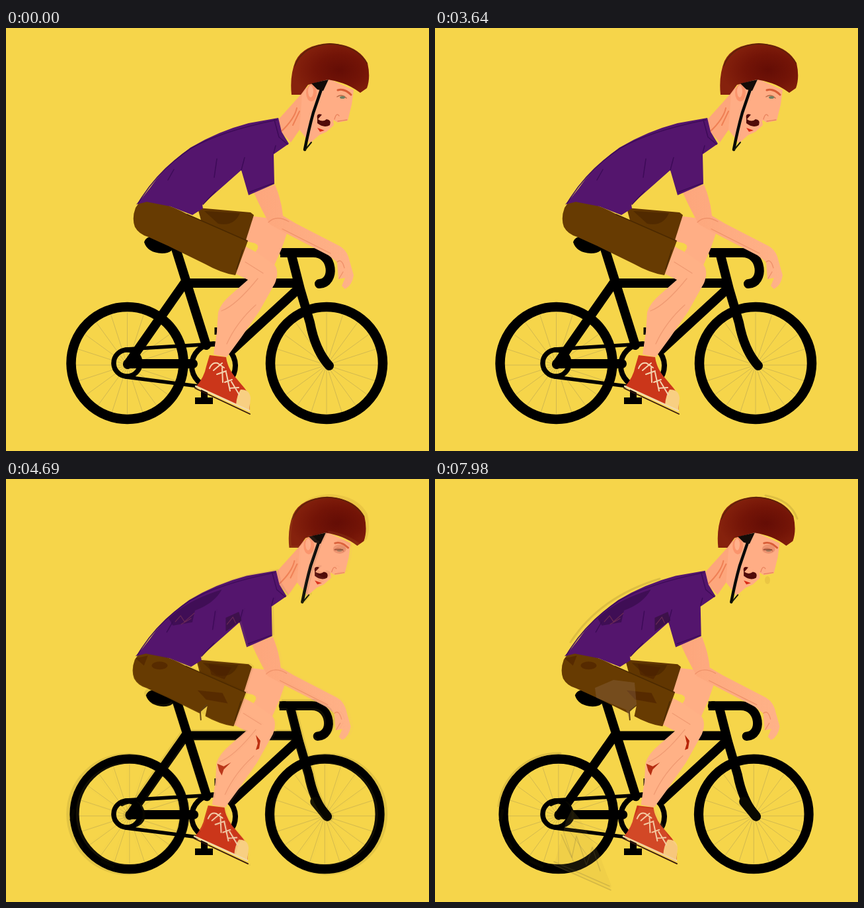
An HTML page for the animation above (8000 ms loop, 640 px wide and 640 px high).

```html
<!DOCTYPE html>
<html lang="en">
<head>
<meta charset="utf-8">
<title>Cyclist</title>
<style>
html, body { margin: 0; width: 100%; height: 100%; overflow: hidden; background: #f6d54a; }
svg { display: block; width: 100vw; height: 100vh; }
.line { fill: none; stroke-linecap: round; stroke-linejoin: round; }
</style>
</head>
<body>
<svg viewBox="0 0 640 640">
  <defs>
    <radialGradient id="helmetFill" cx=".62" cy=".52" r=".6">
      <stop offset="0" stop-color="#640d05"/>
      <stop offset=".5" stop-color="#731407"/>
      <stop offset="1" stop-color="#86220d"/>
    </radialGradient>
    <linearGradient id="skin" x1="0" x2="1">
      <stop offset="0" stop-color="#fda67c"/>
      <stop offset="1" stop-color="#ffb288"/>
    </linearGradient>

    <g id="bike" class="line" stroke="#000">
      <g id="spokes" stroke="#a99854" stroke-width=".8" opacity=".6"></g>
      <g stroke-width="14.500">
        <circle cx="183.5" cy="507" r="85"/>
        <circle cx="485" cy="507" r="85"/>
      </g>
      <g stroke-width="14">
        <path d="M257 334L303 480M270 386H440M270 386L184 509M184 508H283M443 394L342 487"/>
        <path d="M432 344L445 395L460 446Q468 488 489 511"/>
        <path d="M421 340H465C496 340 499 386 474 387"/>
        <path d="M415 340H425" stroke-linecap="butt"/>
      </g>
      <path d="M209 324Q212 313 232 315L254 325Q255 341 236 341Q214 340 209 324Z" fill="#000" stroke="none"/>
    </g>

    <g id="chain" class="line" stroke="#000">
      <circle cx="183" cy="507" r="20" stroke-width="7.500"/>
      <path d="M181 486L315 478M181 528L315 545" stroke-width="5.500"/>
      <circle cx="314" cy="511" r="33" stroke-width="8"/>
      <path d="M286 564H313M300 545V564" stroke-width="10" stroke-linecap="butt"/>
      <path d="M317.500 453V464" stroke-width="4" stroke-linecap="butt"/>
    </g>

    <g id="shoe">
      <path d="M308 495L333 498Q335 513 345 526L361 545Q372 558 368 580L288 542Q300 528 303 512Z" fill="#cb361a"/>
      <path d="M355 547Q369 547 370 560L368 579L348 570Q349 556 355 547Z" fill="#f8cf82"/>
      <path d="M287 542L368 579" class="line" stroke="#f4dba8" stroke-width="2.500"/>
      <path d="M286 545L369 584" class="line" stroke="#38170c" stroke-width="1.800"/>
      <path d="M308 515Q312 505 320 507L330 514M314 518L327 507M319 524L333 519M327 514L328 536M333 521L339 549M331 536L342 532M341 535L353 555M338 545L352 544" class="line" stroke="#f4d4b0" stroke-width="2"/>
    </g>

    <g id="rider">
      <path d="M366 284L400 288L428 302L417 334L405 361L380 350L378 338Q386 328 374 325L360 322Z" fill="#ffae85"/>
      <path d="M290 272L370 279L375 283L363 321L300 310Z" fill="#613601"/>
      <path d="M300 277L354 280Q345 301 321 296Z" fill="#512a00"/>
      <path d="M354 326L380 340L406 358Q414 368 407 386L383 429L356 468L334 498L314 494L319 460L321 430Q325 416 342 402L366 381L344 370Z" fill="#ffb186"/>
      <path d="M326 428Q348 420 381 379M334 478Q349 445 378 419M362 354L389 371" class="line" stroke="#f09a72" stroke-width="1.300"/>
      <path d="M203 262Q235 260 275 282L366 322L347 374Q326 371 301 357L246 330L215 316Q201 312 195 301Q190 288 196 272Z" fill="#673b02"/>
      <path d="M274 282L365 322M349 365L358 336" class="line" stroke="#4b2900" stroke-width="1.500"/>
      <use href="#shoe"/>
      <path d="M375 249L407 237Q417 261 419 284L439 296L505 330Q517 337 520 353L526 374Q524 389 513 395L508 390L513 378L503 380L501 354L488 344L430 314L399 297Q384 270 375 249Z" fill="url(#skin)"/>
      <path d="M397 294Q409 282 428 293M501 354Q508 348 512 363M504 379L510 369M418 304L491 341" class="line" stroke="#ef9169" stroke-width="1.300"/>
      <path d="M409 142L444 103L452 91L462 90L449 147L431 173L416 157Z" fill="#fda67c"/>
      <path d="M416 157Q437 137 440 121M434 147L444 126" class="line" stroke="#ef8055" stroke-width="2"/>
      <path d="M197 267Q212 251 228 228Q249 203 279 181Q321 156 367 144L412 136L417 157L428 175L405 191L406 236L367 253L356 215Q328 240 297 267L298 273L282 283L249 270L213 263Z" fill="#54156d"/>
      <path d="M200 265Q230 215 280 182Q325 156 410 139M356 215L361 196M405 189L408 178M369 248L404 235M254 214L245 230M319 198L315 226M406 139L413 165L426 176M298 267L317 247" class="line" stroke="#3d0b58" stroke-width="1.500"/>
      <path d="M448 100L463 83L489 77L526 94L523 116L517 140L502 143L495 139L496 147L485 157L474 162L460 174L444 154Z" fill="#ffad85"/>
      <ellipse cx="462" cy="98" rx="8" ry="13" fill="#fa946c"/>
      <ellipse cx="461" cy="96" rx="4" ry="9" fill="#ffb08b"/>
      <path d="M502 94Q512 91 522 101" class="line" stroke="#d85d37" stroke-width="3"/>
      <path d="M501 104Q508 99 515 106" class="line" stroke="#b96a46" stroke-width="1.500"/>
      <ellipse cx="509" cy="105" rx="4" ry="2" fill="#718062"/>
      <path d="M497 138Q500 127 504 133M502 141L516 139" class="line" stroke="#e8835d" stroke-width="1.300"/>
      <path d="M471 137Q469 128 478 131L472 138Q479 143 485 138Q493 139 490 147Q481 152 471 144Z" fill="#500b09"/>
      <path d="M471 151L482 155L475 157Z" fill="#d92c16"/>
      <path d="M478 90L465 128Q458 153 452 184" class="line" stroke="#050908" stroke-width="4.500"/>
      <path d="M452 185L462 173" class="line" stroke="#181a0b" stroke-width="2"/>
      <path d="M432 101Q429 72 438 50Q450 25 490 23Q532 25 547 53Q552 75 546 91L536 98Q515 82 487 78L457 86L446 101Z" fill="url(#helmetFill)"/>
      <path d="M437 57Q450 26 490 24Q527 25 546 53" class="line" stroke="#5a2408" stroke-width="1.300"/>
      <path d="M462 84L488 78L480 95L471 93Z" fill="#130c08"/>
    </g>

    <g id="dirt">
      <path d="M248 209Q275 182 329 165Q318 186 288 197L284 215L254 220Z" fill="#390d4e" opacity=".75"/>
      <path d="M335 208L355 199L359 212L335 229Z" fill="#35103f" opacity=".75"/>
      <path d="M258 214L266 205L272 214L287 201M267 218L282 209M337 218L346 207L350 216" class="line" stroke="#6b2a55" stroke-width="1.200"/>
      <g fill="#4b1f00" opacity=".6">
        <path d="M197 270L216 266L210 281Z"/>
        <ellipse cx="234" cy="281" rx="12" ry="6"/>
        <path d="M292 319L330 323L338 339L305 333Z"/>
        <path d="M309 279L344 284L333 302L313 295Z"/>
      </g>
      <path d="M297 351L307 343L303 362L297 358Z" fill="#f6d54a"/>
      <path d="M306 341L296 351L297 364" class="line" stroke="#604013" stroke-width="2"/>
      <path d="M322 431L332 435L343 429L332 440L329 449L325 442Z" fill="#b52d11"/>
      <path d="M381 387L388 396L386 408L381 410L384 400Z" fill="#b72408"/>
      <ellipse cx="509" cy="103" rx="10" ry="7" fill="#d87759" opacity=".5"/>
      <path d="M502 104L514 104" class="line" stroke="#8f4a35" stroke-width="1.500"/>
    </g>

    <g id="mud" class="line" stroke="#080700">
      <path d="M104 548L110 558M94 516L97 502M141 580L158 588" stroke-width="5"/>
      <path d="M172 492Q196 480 204 503Q208 521 188 526" stroke-width="6"/>
      <path d="M470 488L488 510" stroke-width="15"/>
    </g>

    <g id="wornScene">
      <rect width="640" height="640" fill="#f6d54a"/>
      <g transform="translate(350 500) scale(.98) translate(-350 -500)">
        <use href="#bike"/><use href="#mud"/>
      </g>
      <use href="#chain"/>
      <g transform="translate(80 400) scale(.99) translate(-80 -400)">
        <use href="#rider"/><use href="#dirt"/>
      </g>
    </g>
  </defs>

  <rect width="640" height="640" fill="#f6d54a"/>
  <use href="#bike"/>
  <use href="#chain"/>
  <use href="#rider"/>
  <use id="worn" href="#wornScene"/>
  <g id="next">
    <path d="M242 316L270 304L302 308L305 341L294 350L293 361L289 349L244 331Z" fill="#94735a"/>
    <path d="M198 518L207 500L219 514L248 567L267 616L264 622L180 584L189 552Z" fill="#c8a842" opacity=".4"/>
    <path d="M180 584L266 622M180 579L264 616M191 538L207 573L214 540L229 584L238 557L250 593" class="line" stroke="#8a793d" stroke-width="1.500"/>
    <path d="M309 496L333 499L352 539L367 557L364 580L286 543Z" fill="#f0a265" opacity=".55"/>
    <ellipse cx="503" cy="153" rx="4" ry="6" fill="#d3a83b"/>
    <g class="line" stroke="#a78f35" stroke-width="3">
      <path d="M96 495A91 91 0 0 1 190 415M205 247Q250 178 340 151M500 25Q538 31 548 60"/>
    </g>
  </g>
</svg>
<script>
const LOOP = 8000, STEP = 70, SPOKES = 20;
const $ = id => document.getElementById(id);

const spokePath = (cx, cy) => Array.from({ length: SPOKES }, (_, i) => {
  const angle = i * 2 * Math.PI / SPOKES;
  return `M${cx} ${cy}l${79 * Math.cos(angle)} ${79 * Math.sin(angle)}`;
}).join('');
$('spokes').innerHTML = `<path d="${spokePath(183.5, 510)}${spokePath(485, 510)}"/>`;

const fade = (t, start, length) => Math.min(1, Math.max(0, (t - start) / length));

function draw(now) {
  const t = Math.floor((now % LOOP) / STEP) * STEP;
  $('worn').setAttribute('opacity', fade(t, 4100, 640));
  $('next').setAttribute('opacity', fade(t, 7630, 1100));
  requestAnimationFrame(draw);
}
draw(performance.now());
</script>
</body>
</html>
```
